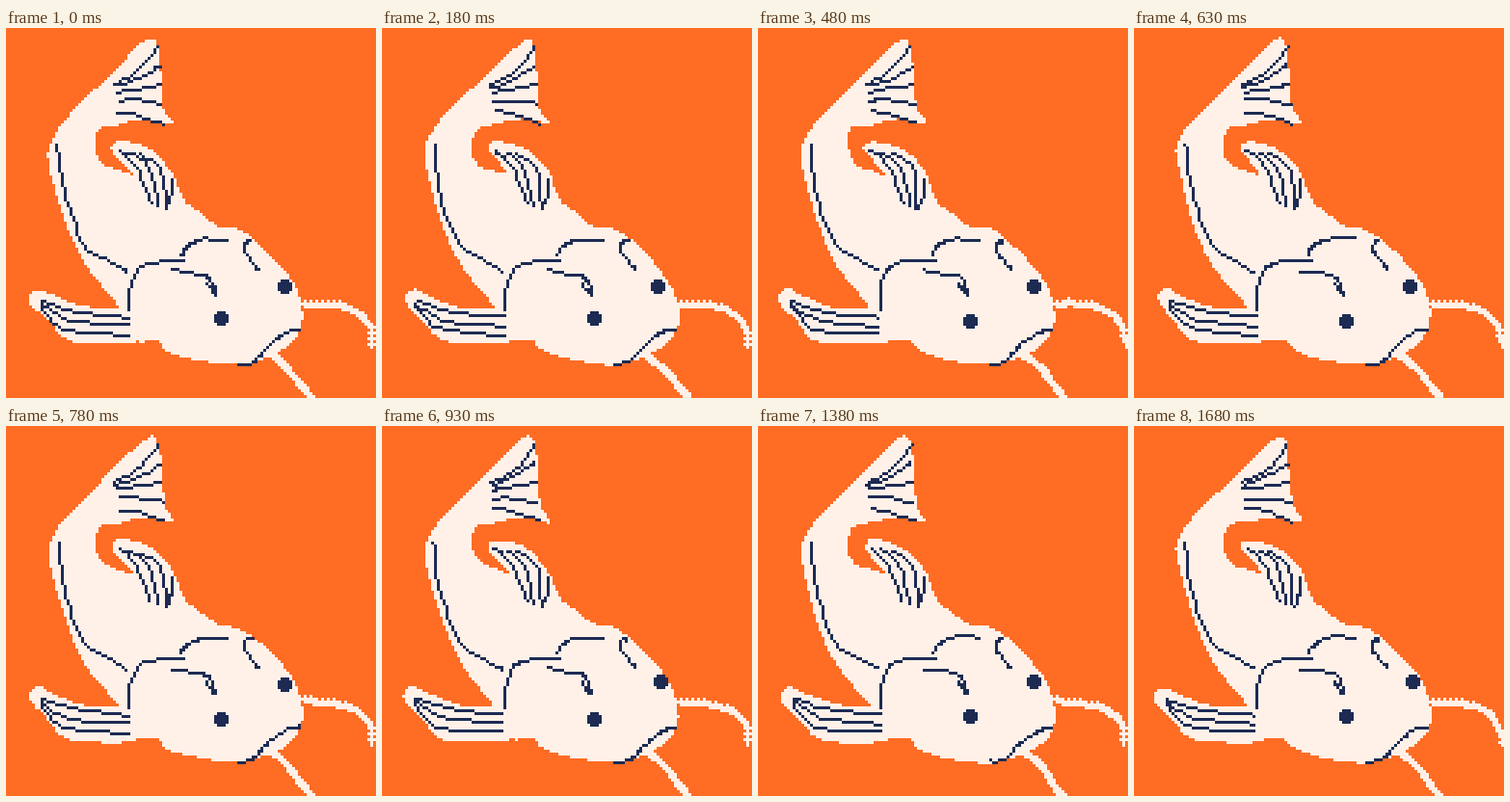
Recreate the animation shown at these times as an HTML page with a canvas. Size 384 px wide and 384 px high, loop 1.8 s.

```html
<!DOCTYPE html>
<html>
<head>
<meta charset="utf-8">
<style>
html, body { margin: 0; width: 100%; height: 100%; overflow: hidden; background: #ff6c24; }
canvas { display: block; width: 384px; height: 384px; image-rendering: pixelated; }
</style>
</head>
<body>
<canvas id="stage" width="384" height="384"></canvas>
<script>
const ctx = document.getElementById('stage').getContext('2d');
const ORANGE = '#ff6c24', CREAM = '#fff1e8', NAVY = '#1d2b53';
const CELL = 3, SIZE = 128;

// Key points of smooth curves, in cells.
const BODY = '38,17 23,29 15.4,40 15.4,49 21,68 28,83 40,98 45,107.6 52,108 56,111.6 66,114.8 80,116.4 91,113.8 99,109 102.4,102 101.6,94 98,86 90,77 81,70 73,68.4 65,62.5 55,56 42,50.5 34,47.6 31,42 33,34.4 43,31.6';
const TAIL = '32,21.5 40.5,12 48,4.8 52,4.4 53.8,14 54.6,27 58,33 50,31.8 36,32';
const DORSAL = '37,41 40,39.3 50,42.3 57,49 60,56 62,63 50,62 45,53 42,48.5 37.4,43';
const PECTORAL = '8,92.5 11,90.2 15,92 26,96.3 36,97 45,97 46,108 30,109.2 20,107.5 14,101 9,96';

const LATERAL = '17.4,39 19.5,56 26,74 34,79.5 41,83.5';
const GILL = '42,98 42,91 45,83 51,80.4 61,80';
const FOREHEAD = '60,79 61.5,75.5 67,72.8 76,72.8';
const NOSTRIL = '56,83.4 64,84.6 70,86 72,92 69,88';
const BROW = '85,74 83,73 82,77 87,83';
const MOUTH = '79,115.8 85,115 90,110 96,105 101,103.8';
const SIDE_WHISKER = '102,94.6 110,94.8 119,97 125,102 126.6,109';
const CHIN_WHISKER = '91,112 97,117 101,122 105,127';

const parse = text => text.split(' ').map(pair => pair.split(',').map(Number));
const dot = (x, y, w = 1, h = 1) => ctx.fillRect(x, y, w, h);
const swing = (pose, period, peak = 0) => Math.cos((pose - peak) / period * 2 * Math.PI);

let seed = 0;
function noise() {
  const s = Math.sin(++seed * 12.9898) * 43758.5453;
  return (s - Math.floor(s)) * 2 - 1;
}

const wobble = (points, slide = 0, amount = 0.4) =>
  points.map(([x, y]) => [x + slide + noise() * amount, y + noise() * amount]);

// Catmull-Rom curve through the points.
function smooth(points, closed) {
  const n = points.length, out = [];
  const at = i => points[closed ? (i + n) % n : Math.max(0, Math.min(n - 1, i))];
  for (let i = 0; i < (closed ? n : n - 1); i++) {
    for (let t = 0; t < 1; t += 0.125) {
      out.push([0, 1].map(k => {
        const [a, b, c, d] = [-1, 0, 1, 2].map(j => at(i + j)[k]);
        return b + t / 2 * (c - a + t * (2 * a - 5 * b + 4 * c - d + t * (3 * (b - c) + d - a)));
      }));
    }
  }
  if (!closed) out.push(points[n - 1]);
  return out;
}

function blob(text, slide) {
  const points = smooth(wobble(parse(text), slide), true);
  for (let row = 0; row < SIZE; row++) {
    const y = row + 0.5, hits = [];
    points.forEach(([ax, ay], i) => {
      const [bx, by] = points[(i + 1) % points.length];
      if (ay <= y !== by <= y) hits.push(ax + (y - ay) / (by - ay) * (bx - ax));
    });
    hits.sort((a, b) => a - b);
    for (let i = 0; i + 1 < hits.length; i += 2) {
      const left = Math.round(hits[i]);
      dot(left, row, Math.round(hits[i + 1]) - left);
    }
  }
}

function stroke(points, slide = 0, brush = (x, y) => dot(x, y)) {
  const path = smooth(wobble(points, slide));
  let count = 0;
  for (let i = 1; i < path.length; i++) {
    const [ax, ay] = path[i - 1].map(Math.round);
    const [bx, by] = path[i].map(Math.round);
    const steps = Math.max(Math.abs(bx - ax), Math.abs(by - ay));
    for (let k = 1; k <= steps; k++) {
      brush(Math.round(ax + (bx - ax) * k / steps), Math.round(ay + (by - ay) * k / steps), count++);
    }
  }
}

function plus(x, y) {
  dot(x - 1, y, 3);
  dot(x, y - 1, 1, 3);
}

function eye(x, y) {
  dot(x - 1, y - 2, 3, 5);
  dot(x - 2, y - 1, 5, 3);
}

function drawRays(finSlide) {
  for (let i = 0; i < 5; i++) {
    const root = [36.3 + 0.3 * i, 19.6 + 0.55 * i * i], tip = [52.3 + 0.4 * i, 6 + 6.6 * i];
    const sag = 1.4 - 0.7 * i;
    stroke([root, [(root[0] + tip[0]) / 2 + sag, (root[1] + tip[1]) / 2 + sag], tip]);
  }
  for (let i = 0; i < 3; i++) {
    stroke([[38 + 3.5 * i, 41.5 + 0.6 * i], [44 + 4.5 * i, 47 + 0.5 * i], [49.5 + 2.6 * i, 60 + i]]);
    stroke([[11, 93.5 + 0.8 * i], [24 - 2 * i, 97.5 + 3 * i], [42, 99.5 + 3 * i]], finSlide);
  }
  stroke([[57, 51], [57, 57], [55, 62]]);
}

function draw(pose) {
  seed = pose * 500;
  const finSlide = 0.5 * swing(pose, 4.5) - 0.4;
  ctx.setTransform(CELL, 0, 0, CELL, 0, 0);
  ctx.fillStyle = ORANGE;
  dot(0, 0, SIZE, SIZE);

  ctx.fillStyle = CREAM;
  [BODY, TAIL, DORSAL].forEach(shape => blob(shape));
  blob(PECTORAL, finSlide);
  stroke(parse(SIDE_WHISKER), 0, (x, y, n) => n % 2 ? dot(x, y, 1, 2) : plus(x, y));
  stroke(parse(CHIN_WHISKER), 0, plus);

  ctx.fillStyle = NAVY;
  [LATERAL, GILL, FOREHEAD, NOSTRIL, BROW, MOUTH].forEach(line => stroke(parse(line)));
  drawRays(finSlide);
  eye(95 + (swing(pose, 6, -0.5) > 0.1), 88 + (swing(pose, 12, 2.5) > 0));
  eye(73 + (swing(pose, 5) > 0.5), 100 + (swing(pose, 12, 5) > 0));
}

let shown = -1;
function tick(now) {
  const t = now % 1800;
  const pose = t < 180 ? 0 : 1 + Math.floor((t - 180) / 150);
  if (pose !== shown) draw(shown = pose);
  requestAnimationFrame(tick);
}
requestAnimationFrame(tick);
</script>
</body>
</html>
```
